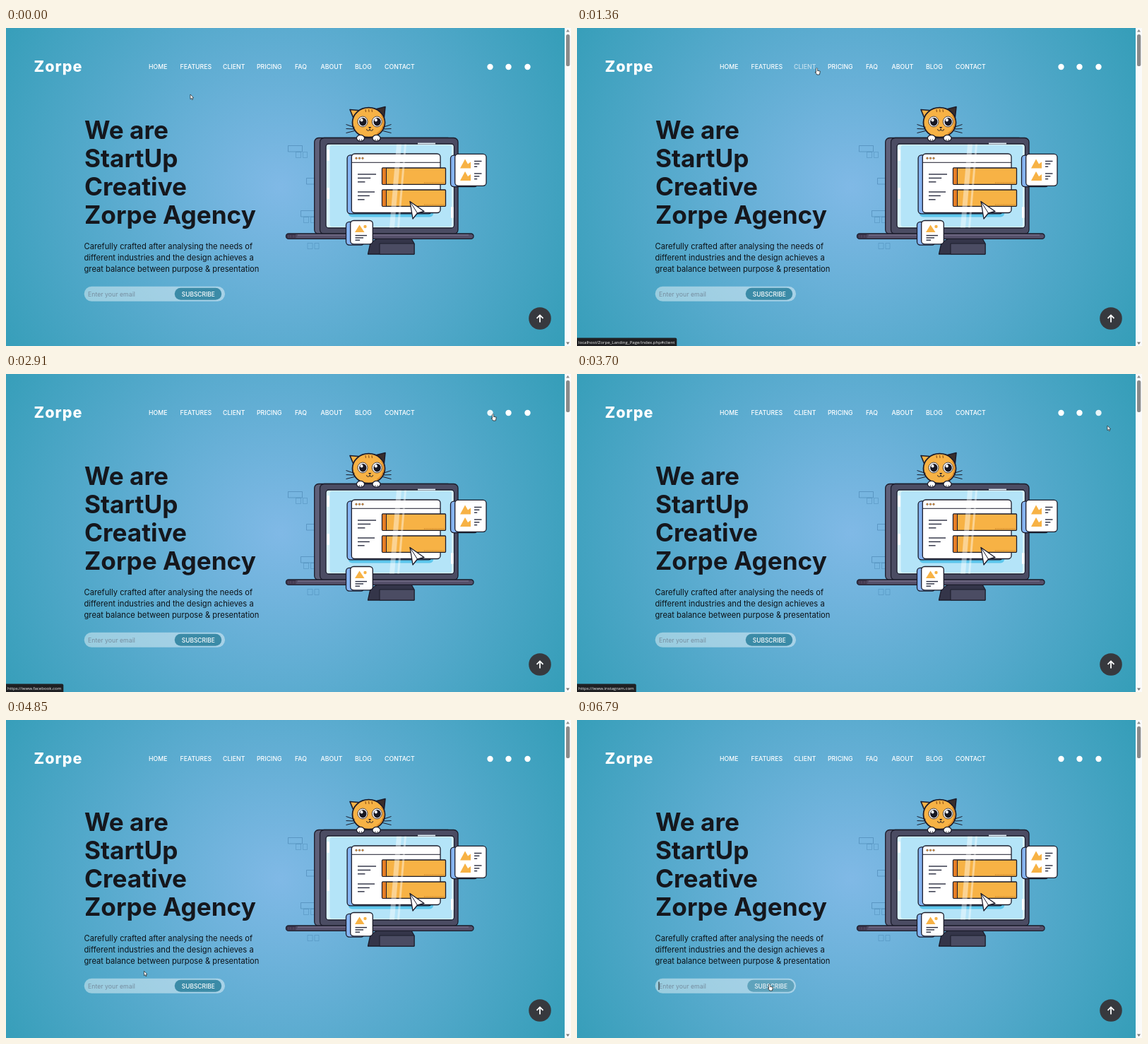
These frames come from a looping animation (800x450 px, 6880 ms). An HTML page with a canvas:

```html
<!DOCTYPE html>
<html lang="en">
<head>
<meta charset="utf-8">
<title>Landing page</title>
<style>
html, body { margin: 0; width: 100%; height: 100%; overflow: hidden; background: #369eb9; }
canvas { display: block; width: 800px; height: 450px; }
</style>
</head>
<body>
<canvas id="stage"></canvas>
<script>
const LOOP = 6880, CLICK = 6430;
const INK = '#1b1c2b', ORANGE = '#f7b245', SLATE = '#4b4c63', BLUE = '#86b4f2';
const FONT = 'Inter, "Open Sans", sans-serif';
const URL_FONT = '"Open Sans", "Noto Sans", sans-serif';
const canvas = document.getElementById('stage');
const dpr = window.devicePixelRatio || 1;
canvas.width = 800 * dpr;
canvas.height = 450 * dpr;
const c = canvas.getContext('2d');

const NAV = { HOME: 202, FEATURES: 246.5, CLIENT: 307, PRICING: 355, FAQ: 409, ABOUT: 445.5, BLOG: 494, CONTACT: 536 };
const HASH = { HOME: '', FEATURES: '#products_features', ABOUT: '#team' };
const SOCIAL = { 'www.facebook.com': 685.5, 'twitter.com': 711.5, 'www.instagram.com': 738.5 };

// time, x, y of the pointer tip
const PATH = [
  [0, 261, 94], [380, 212, 57], [730, 243, 57], [2030, 460, 57], [2850, 678, 57], [3400, 740, 57],
  [3700, 751, 73], [4200, 645, 184], [4850, 196, 355], [5100, 128, 375], [6000, 270, 374], [LOOP, 272, 374]
];

// Hover zones laid out from the link positions
function makeLinks() {
  c.font = `500 8.75px ${FONT}`;
  const nav = Object.entries(NAV).map(([label, x]) => ({
    label, x, from: x - 9, to: x + c.measureText(label).width + 9,
    url: 'localhost/Zorpe_Landing_Page/index.php' + (HASH[label] ?? '#' + label.toLowerCase())
  }));
  const social = Object.entries(SOCIAL).map(([host, x]) => ({ x, from: x - 8, to: x + 8, url: 'https://' + host }));
  return [...nav, ...social];
}
const links = makeLinks();

const overLink = l => ([x, y]) => y > 47 && y < 66 && x >= l.from && x < l.to;
const overPill = ([x, y]) => y > 366 && y < 387 && x > 111;
const overButton = p => overPill(p) && p[0] > 239;
const linkAt = t => links.find(l => overLink(l)(pointerAt(t)));

function pointerAt(t) {
  let i = 0;
  while (i < PATH.length - 2 && t >= PATH[i + 1][0]) i++;
  const a = PATH[i], b = PATH[i + 1], p = PATH[i - 1] || a, n = PATH[i + 2] || b;
  const d = b[0] - a[0], u = Math.max(0, t - a[0]) / d, v = u * u * (3 - 2 * u);
  const slope = (k, q, r, s) => (r[k] - q[k]) * (s[k] - r[k]) > 0 ? (s[k] - q[k]) / (s[0] - q[0]) * d : 0;
  return [1, 2].map(k => a[k] + (b[k] - a[k]) * v
    + slope(k, p, a, b) * u * (1 - u) ** 2 - slope(k, a, b, n) * u * u * (1 - u));
}

// Linear hover transition: share of the last span ms spent over the item
function fade(t, over, span) {
  let hits = 0;
  for (let k = 0; k < 16; k++) hits += over(pointerAt(t - span * k / 16));
  return hits / 16;
}

function paint(fill, stroke, w = 1.3) {
  if (fill) { c.fillStyle = fill; c.fill(); }
  if (stroke) { c.strokeStyle = stroke; c.lineWidth = w; c.stroke(); }
}
function box(x, y, w, h, r, fill, stroke, lw) {
  c.beginPath();
  c.roundRect(x, y, w, h, r);
  paint(fill, stroke, lw);
}
function poly(pts, fill, stroke, w) {
  c.beginPath();
  for (let i = 0; i < pts.length; i += 2) c.lineTo(pts[i], pts[i + 1]);
  c.closePath();
  paint(fill, stroke, w);
}
function line(x, y, x2, y2, stroke, w) {
  c.beginPath();
  c.moveTo(x, y);
  c.lineTo(x2, y2);
  paint(null, stroke, w);
}
function oval(x, y, rx, ry, fill, stroke, w) {
  c.beginPath();
  c.ellipse(x, y, rx, ry, 0, 0, Math.PI * 2);
  paint(fill, stroke, w);
}
function text(s, x, y, size, weight, color, gap = 0, family = FONT) {
  c.font = `${weight} ${size}px ${family}`;
  c.letterSpacing = gap + 'px';
  c.fillStyle = color;
  c.fillText(s, x, y);
}
// Short rows of writing, each shorter than the last
function rows(x, y, w, step) {
  for (let i = 0; i < 3; i++) line(x, y + i * step, x + w * (1 - .3 * i), y + i * step, '#2a2d40', 1.4);
}
// White panel with a blue panel behind it
function panel(x, y, w, h) {
  box(x - 6.2, y + 1.8, w - 6, h - .5, 4.5, BLUE, INK);
  box(x, y, w, h, 4.5, '#fff', INK);
}

function background() {
  const g = c.createRadialGradient(388, 225, 0, 388, 225, 455);
  g.addColorStop(0, '#80b9e6');
  g.addColorStop(1, '#369eb9');
  c.fillStyle = g;
  c.fillRect(0, 0, 800, 450);
  c.fillStyle = '#fafafa';
  c.fillRect(791, 0, 9, 450);
  box(793, 9, 5.3, 45, 2.6, '#8a8a8a');
  poly([793, 5.5, 798, 5.5, 795.5, 2], '#8a8a8a');
  poly([793, 444.5, 798, 444.5, 795.5, 448], '#777');
}

function bricks() {
  const tone = 'rgba(62,120,165,.5)';
  for (let i = 0; i < 4; i++) {
    const y = 166.5 + 46 * i, x = i % 2 ? 425.5 : 399.5 + 9 * i;
    if (i < 3) box(x, y, i % 2 ? 11 : 20, 8.5, 0, null, tone, 1);
    if (i === 1) continue;
    const bx = 410.5 + 5.5 * i, by = y + (i < 3 ? 9 : 0);
    box(bx, by, 7, 8, 0, null, tone, .7);
    box(bx + 10, by, 6, 8, 0, null, tone, .7);
  }
}

function laptop() {
  c.lineJoin = 'round';
  poly([526, 298, 574, 298, 578, 305, 578, 320, 512.5, 320, 516, 304], '#343549', INK);
  box(529, 305, 49, 15, 0, SLATE, INK, 1);

  box(436.7, 155.5, 195, 136, 6, '#5f6079', INK);
  box(444.5, 155.5, 195.5, 136, 6, SLATE, INK);
  box(453, 164, 181.5, 119, 4, '#d9f3fd', INK);
  box(458.5, 166, 172.5, 115, 3, '#b4e4f8');
  line(583, 163.5, 608, 163.5, '#e8f6ff', 1.8);
  for (let i = 0; i < 4; i++) box(i % 2 ? 630 : 454.3, 172 + 27 * i, 3.5, 16, 1, '#fff');

  box(485, 185, 120, 82.5, 5, '#5cc6ec');
  panel(489.3, 178, 125.7, 83.5);
  line(489.5, 190.3, 615, 190.3, INK, 1);
  for (let i = 0; i < 3; i++) oval(496 + 4.5 * i, 184.3, 1.3, 1.3, '#ee9a3a', INK, .4);
  rows(498, 207, 26, 5.4);
  rows(498, 232, 24, 5.4);

  for (const y of [198, 229]) {
    box(532.5, y, 90, 23.3, 1, ORANGE, INK);
    box(533, y + .7, 5, 22, 0, '#e57d24');
    line(538.5, y, 538.5, y + 23, INK, 1);
    c.setLineDash([1, 1.2]);
    line(592, y + 21, 621, y + 21, '#b66c1b', 1);
    c.setLineDash([]);
  }
  for (const [x, w] of [[553, 7], [564, 3]])
    poly([x, 164.7, x + w, 164.7, x + w - 10, 282.5, x - 10, 282.5], 'rgba(255,255,255,.42)');

  poly([572, 245.5, 592, 259.5, 582.5, 262, 576, 270], '#fff', INK);
  line(572, 245.5, 582.5, 262, INK, 1);

  box(396.5, 291, 265.5, 7.3, 3.6, '#55506a', INK);
  line(413, 293, 655, 293, '#817b96', 1);
  box(397.3, 292, 14, 5.3, 2.5, '#383148');
  for (let x = 400; x < 411; x += 2.5) line(x, 293, x, 296.5, '#77677f', .7);
}

function cards() {
  panel(635.7, 178.3, 44.3, 45);
  for (const y of [198.5, 216]) {
    poly([643, y, 650, y - 13, 654, y - 6, 658, y - 9, 658, y], ORANGE);
    rows(663, y - 10, 10.5, 3.8);
  }
  panel(487.7, 272.5, 31.6, 33.3);
  poly([494, 289, 500.5, 278.5, 507.5, 289], ORANGE);
  oval(508.5, 281, 2.2, 2.2, ORANGE);
  rows(494.5, 293.6, 16.5, 3.3);
}

function cat() {
  poly([493, 130, 487, 115.5, 504, 117], ORANGE, INK, 1.6);
  poly([519, 116, 537, 111.5, 535, 130], '#3a2e2c', INK, 1.6);
  oval(513.5, 133.7, 23, 21, ORANGE, INK, 1.8);
  c.beginPath();
  c.ellipse(513.5, 133.7, 21.2, 19.2, 0, -.6, 1);
  paint(null, '#dd8a28', 1.6);
  for (let x = 509; x < 519; x += 4.5) line(x, 115, x + .5, 119, '#9b5d1d', 1.3);
  for (const x of [505, 525.3]) {
    oval(x, 132.5, 7, 7.4, '#fff', INK, .8);
    oval(x + .3, 132.7, 5.2, 5.8, '#171722');
    oval(x - 1.5, 130.2, 2, 2.2, '#fff');
  }
  poly([513, 140, 517.3, 140, 515.1, 142.5], INK);
  for (const x of [512.8, 517.3]) {
    c.beginPath();
    c.arc(x, 143, 2.3, 0, Math.PI);
    paint(null, INK, .9);
  }
  for (const side of [-1, 1])
    for (let i = -1; i < 2; i++)
      line(513.5 + 20 * side, 143 + 2.5 * i, 513.5 + 32 * side, 142.5 + 6 * i, INK, 1);
  for (const x of [502, 524.5]) {
    oval(x, 155.8, 5.6, 4.4, '#fff', INK);
    for (const d of [-1.6, 1.6]) line(x + d, 157, x + d, 159.5, INK, .7);
  }
}

function header(t) {
  text('Zorpe', 39.5, 62, 21.6, 800, '#fff', 1);
  for (const l of links) {
    const color = `rgba(255,255,255,${1 - .38 * fade(t, overLink(l), 300)})`;
    if (l.label) text(l.label, l.x, 58.3, 8.75, 500, color);
    else oval(l.x, 55, 4.2, 4.2, color);
  }
}

function copy(t) {
  ['We are', 'StartUp', 'Creative', 'Zorpe Agency'].forEach((s, i) =>
    text(s, 111, 157 + 40 * i, 35.2, 700, '#15171d'));
  ['Carefully crafted after analysing the needs of',
    'different industries and the design achieves a',
    'great balance between purpose & presentation'].forEach((s, i) =>
    text(s, 110.5, 313 + 16 * i, 11.2, 400, '#0c1218'));

  box(110.7, 365.7, 199.3, 21.1, 10.5, 'rgba(255,255,255,.43)');
  text('Enter your email', 116, 379.5, 8.75, 400, '#768d9f');
  if (t >= CLICK) line(116, 370.5, 116, 382, '#111', 1);

  const h = fade(t, overButton, 500), e = h * (2 - h);
  c.save();
  c.translate(2.4 * e, 0);
  c.globalAlpha = 1 - .35 * e;
  box(238.8, 367.7, 66.4, 17.1, 8.5, '#3b8ba7');
  c.globalAlpha = 1 - .12 * e;
  text('SUBSCRIBE', 248.8, 379.7, 8.4, 500, '#fff');
  c.restore();

  oval(756, 411, 15.8, 15.8, '#37393e');
  line(756, 416.5, 756, 406.5, '#fff', 1.8);
  c.beginPath();
  c.moveTo(751.5, 410.8);
  c.lineTo(756, 406.3);
  c.lineTo(760.5, 410.8);
  paint(null, '#fff', 1.8);
}

function status(t) {
  // The bar lingers briefly after the pointer leaves a link
  const link = [0, 80, 160, 240].map(d => linkAt(t - d)).find(Boolean);
  if (!link) return;
  c.font = `400 6.1px ${URL_FONT}`;
  c.letterSpacing = '0px';
  box(0, 438.5, c.measureText(link.url).width + 5, 11.5, [0, 2, 0, 0], '#1f2023');
  text(link.url, 2, 446.6, 6.1, 400, '#f1f1f1', 0, URL_FONT);
}

function pointer(t) {
  const p = pointerAt(t);
  c.save();
  c.translate(...p);
  if (linkAt(t) || overButton(p)) {
    box(-.9, -.2, 1.9, 6, .9, '#fff', '#222', .8);
    poly([-.8, 5.6, -2.3, 5.4, .2, 9, 3.9, 9, 4.8, 4.2, .9, 3.2], '#fff', '#222', .8);
    box(-.5, .3, 1.1, 6, .5, '#fff');
  } else if (overPill(p)) {
    line(0, -3.5, 0, 4.5, '#222', .8);
    for (const y of [-3.5, 4.5]) line(-1.5, y, 1.5, y, '#222', .7);
  } else {
    poly([0, 0, 0, 6.6, 1.5, 5.3, 2.5, 7.6, 3.6, 7.1, 2.7, 4.9, 4.6, 4.7], '#fff', '#222', .7);
  }
  c.restore();
}

function frame(t) {
  c.setTransform(dpr, 0, 0, dpr, 0, 0);
  background();
  bricks();
  laptop();
  cards();
  cat();
  header(t);
  copy(t);
  status(t);
  pointer(t);
}

const start = performance.now();
function tick() {
  frame((performance.now() - start) % LOOP);
  requestAnimationFrame(tick);
}
tick();
</script>
</body>
</html>
```
